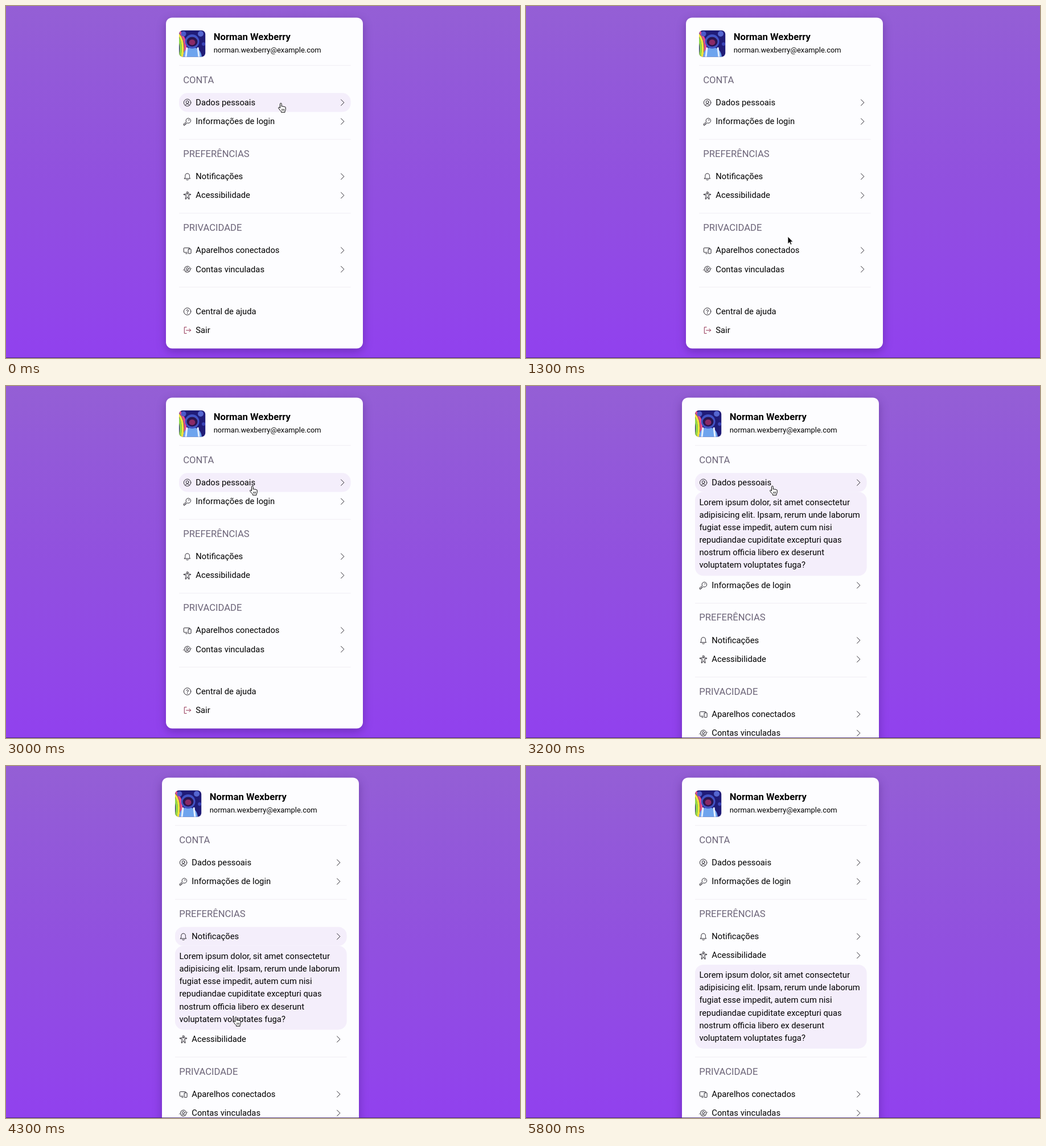
Write an HTML page that moves like this. It is 903 px wide and 620 px high and loops after 6.99 s.

```html
<!DOCTYPE html>
<html lang="pt">
<head>
<meta charset="utf-8">
<style>
  html, body { margin: 0; width: 100%; height: 100%; overflow: hidden; }
  svg { display: block; width: 903px; height: 620px; font: 14.77px Roboto, sans-serif; }
  #card { fill: #fdfdff; filter: drop-shadow(0 5px 8px rgba(30, 0, 70, .3)); }
  .icon { fill: none; stroke: #1d1a22; stroke-width: .95; stroke-linejoin: round; stroke-linecap: round; }
  .exit { stroke: #8c2347; }
  .title { font-size: 16.6px; fill: #6d6579; }
  .rule { fill: #f0edf3; }
  .tint { fill: #f4eefb; }
</style>
</head>
<body>
<svg viewBox="0 0 903 620">
  <defs>
    <linearGradient id="sky" x2="0" y2="1">
      <stop stop-color="#945fd5"/><stop offset=".5" stop-color="#9150df"/><stop offset="1" stop-color="#9141ee"/>
    </linearGradient>
    <clipPath id="frame"><rect x="304" y="43" width="46.2" height="46.5" rx="6.5"/></clipPath>
  </defs>
  <rect width="903" height="620" fill="url(#sky)"/>
  <g id="menu">
    <rect id="card" x="281" y="20.4" width="346" rx="11"/>
    <g clip-path="url(#frame)">
      <rect x="304" y="43" width="47" height="47" fill="#201c78"/>
      <g fill="none" stroke-width="4">
        <path d="M303 50Q314 62 309 90" stroke="#f4e53c"/>
        <path d="M303 57Q310 70 305 90" stroke="#8fd84a"/>
        <path d="M305 45Q320 62 313 90" stroke="#e8508c"/>
      </g>
      <circle cx="312" cy="49" r="4.5" fill="#4b58c8"/>
      <circle cx="342" cy="49" r="5" fill="#5566d0"/>
      <circle cx="347" cy="67" r="3" fill="#3a44b8"/>
      <path d="M311 90q1-17 16-17t17 17z" fill="#6ea4ee"/>
      <path d="M318 73l-2 17M337 73l2 17" stroke="#e6f0ff" stroke-width="3"/>
      <circle cx="327" cy="62.5" r="12.5" fill="#4152c4"/>
      <ellipse cx="327" cy="63" rx="9.5" ry="8.5" fill="#2a1450"/>
      <ellipse cx="327" cy="64" rx="5.5" ry="5" fill="#8a2a68"/>
    </g>
    <text x="364.7" y="60" font-size="16.7" font-weight="700">Norman Wexberry</text>
    <text x="364.7" y="82" font-size="12.92">norman.wexberry@example.com</text>
    <g id="blocks"></g>
    <g id="panel"><rect class="tint" x="304" width="301.6" height="147.7" rx="14.8"/></g>
  </g>
  <g id="hand" fill="#fff" stroke="#000" stroke-linejoin="round">
    <path d="M-1.5 9V1.5a1.35 1.35 0 0 1 2.7 0V6.2a1.3 1.3 0 0 1 2.5.3a1.3 1.3 0 0 1 2.4.5a1.2 1.2 0 0 1 2.1.8v3.4q0 1.6-1.2 3.2v1.8h-6.5v-1.4q-2.6-2.4-4.6-5.6-.8-1.5.4-1.9 1.2-.2 2.2 1.5z"/>
    <path d="M1.7 10.2v3.3M3.6 10.2v3.3M5.5 10.2v3.3" stroke-width=".8"/>
  </g>
  <path id="arrow" d="M0 0v13l3-2.8 1.9 4.3 2-.9-1.9-4.2h4z" stroke="#fff" stroke-width=".8"/>
  <rect y="619" width="903" height="1" fill="#3d2273" opacity=".8"/>
</svg>
<script>
const LOOP = 6990, ROW = 33.23, PANEL = 147.7;
const $ = id => document.getElementById(id);
const dot = (x, y, r) => `<circle cx="${x}" cy="${y}" r="${r}"/>`;
const path = d => `<path d="${d}"/>`;

const icons = {
  user: dot(0, 0, 6.2) + dot(0, -1, 2.4) + path('M-4 4.6a4.6 4.6 0 0 1 8 0'),
  key: path('M-2 .8a4.3 4.3 0 1 1 1.9 1.7l-1.2 1.1h-1.6v1.6h-1.5v1.4h-2v-2z') + dot(2.6, -2.6, .4),
  bell: path('M-5 3.6h10c-1.4-1.5-1.2-3-1.2-4.6a3.8 4.4 0 0 0-7.6 0c0 1.6.2 3.1-1.2 4.6zM-1.7 5.7q1.7 1 3.4 0'),
  person: dot(0, -5, 1.5) + path('M-6-2.2L-1.5-2.6h3L6-2.2V-1.2L2-.2 3.6 6.2 2.4 6.6 0 2.4-2.4 6.6-3.6 6.2-2-.2-6-1.2z'),
  devices: path('M-.5 3.5h-4.8a1 1 0 0 1-1-1v-6a1 1 0 0 1 1-1h8.6a1 1 0 0 1 1 1v.6M-2.8 5.6h2.4') +
    '<rect x="1.5" y="-2.5" width="5" height="8" rx="1"/>',
  linked: dot(0, -.9, 2) + path('M-3 3.6a3.8 3.8 0 0 1 6 0M-5.2-.6a5.3 5.3 0 0 1 10.2-1.4M5.2.6a5.3 5.3 0 0 1-10.2 1.4M3.6-1.6l1.8 1.6 1.6-1.6M-7 1.6l1.6-1.6 1.8 1.6'),
  help: dot(0, 0, 6.2) + path('M-1.7-1.5a1.8 1.6 0 1 1 1.8 1.8v.9') + dot(0, 3.3, .2),
  exit: path('M-1.5-5.5h-3.8v11h3.8M-2 0h8M3.2-2.8l2.8 2.8-2.8 2.8')
};

const blocks = [];
const add = (y, html, isRow) => {
  const el = document.createElementNS('http://www.w3.org/2000/svg', 'g');
  el.innerHTML = html;
  $('blocks').append(el);
  blocks.push({ y, el, isRow });
};
const rule = y => add(y, '<rect class="rule" x="304" width="301.6" height="1"/>');
const row = (y, icon, label, chevron = true) => add(y, `
  <rect class="tint" x="304" width="301.6" height="${ROW}" rx="14.8"/>
  <g class="icon ${icon}" transform="translate(318.6 16.9)">${icons[icon]}</g>
  <text x="333.3" y="21.7">${label}</text>
  ${chevron ? '<path class="icon" d="M588.6 11.6l5.2 5.2-5.2 5.2"/>' : ''}`, true);
const section = (y, title, ...rows) => {
  rule(y);
  add(y, `<text class="title" x="311.3" y="31.4">${title}</text>`);
  rows.forEach(([icon, label], i) => row(y + 49.1 + i * ROW, icon, label));
};

section(104.2, 'CONTA', ['user', 'Dados pessoais'], ['key', 'Informações de login']);
section(234.4, 'PREFERÊNCIAS', ['bell', 'Notificações'], ['person', 'Acessibilidade']);
section(364.5, 'PRIVACIDADE', ['devices', 'Aparelhos conectados'], ['linked', 'Contas vinculadas']);
rule(494.6);
row(521.1, 'help', 'Central de ajuda', false);
row(554.3, 'exit', 'Sair', false);
const rows = blocks.filter(b => b.isRow);

['Lorem ipsum dolor, sit amet consectetur', 'adipisicing elit. Ipsam, rerum unde laborum',
 'fugiat esse impedit, autem cum nisi', 'repudiandae cupiditate excepturi quas',
 'nostrum officia libero ex deserunt', 'voluptatem voluptates fuga?'].forEach((line, i) =>
  $('panel').insertAdjacentHTML('beforeend', `<text x="311.4" y="${23.2 + i * 22.15}">${line}</text>`));

// Click time, time of the next pointer move (when hover refreshes), row opened
const clicks = [[3200, 3300, 0], [4300, 4600, 2], [5000, 5700, 3]];
const openRow = (t, column) => clicks.reduce((open, c) => t >= c[column] ? rows[c[2]] : open, null);
const blockTop = (block, open) => block.y + (open && block.y > open.y ? PANEL : 0);

// Pointer tip: time, x, y
const track = [
  [0, 483, 171], [100, 488, 190], [300, 510, 420], [400, 513, 510], [500, 508, 557],
  [700, 478, 425], [900, 462, 250], [1000, 458, 215], [1100, 456, 260], [1300, 460, 406],
  [1400, 455, 425], [1500, 456, 430], [1600, 456, 430], [1900, 447, 505], [2100, 437, 555],
  [2300, 434, 571], [2400, 433, 564], [2700, 456, 380], [3000, 433, 176], [3200, 433, 176],
  [3500, 424, 280], [3800, 410, 396], [3900, 406, 428], [4000, 404, 442], [4500, 404, 442],
  [4900, 402, 470], [5600, 402, 470], [5700, 643, 440], [LOOP, 643, 440]
];
const pointer = t => {
  const i = track.findIndex(k => k[0] > t);
  const [a, b] = [track[i - 1], track[i]];
  const p = (t - a[0]) / (b[0] - a[0]);
  return [a[1] + (b[1] - a[1]) * p, a[2] + (b[2] - a[2]) * p];
};

const move = (el, x, y) => el.setAttribute('transform', `translate(${x} ${y})`);
const show = (el, on) => el.setAttribute('visibility', on ? 'visible' : 'hidden');

function draw() {
  const t = Math.floor(performance.now() % LOOP / 100) * 100;
  const open = openRow(t, 0), hitOpen = openRow(t, 1);
  const [x, y] = pointer(t);
  const visible = t < 5800;
  const hovered = rows.find(r => {
    const dy = y - blockTop(r, hitOpen);
    return visible && x > 300 && x < 603 && dy >= 0 && dy < ROW;
  });

  move($('menu'), open ? -7 : 0, 0);
  $('card').setAttribute('height', 582.8 + (open ? PANEL : 0));
  blocks.forEach(b => move(b.el, 0, blockTop(b, open)));
  rows.forEach(r => show(r.el.firstElementChild, r === hovered));
  show($('panel'), open);
  if (open) move($('panel'), 0, open.y + ROW);

  for (const id of ['hand', 'arrow']) {
    move($(id), x, y);
    show($(id), visible && (id === 'hand') === !!hovered);
  }
  requestAnimationFrame(draw);
}
draw();
</script>
</body>
</html>
```
